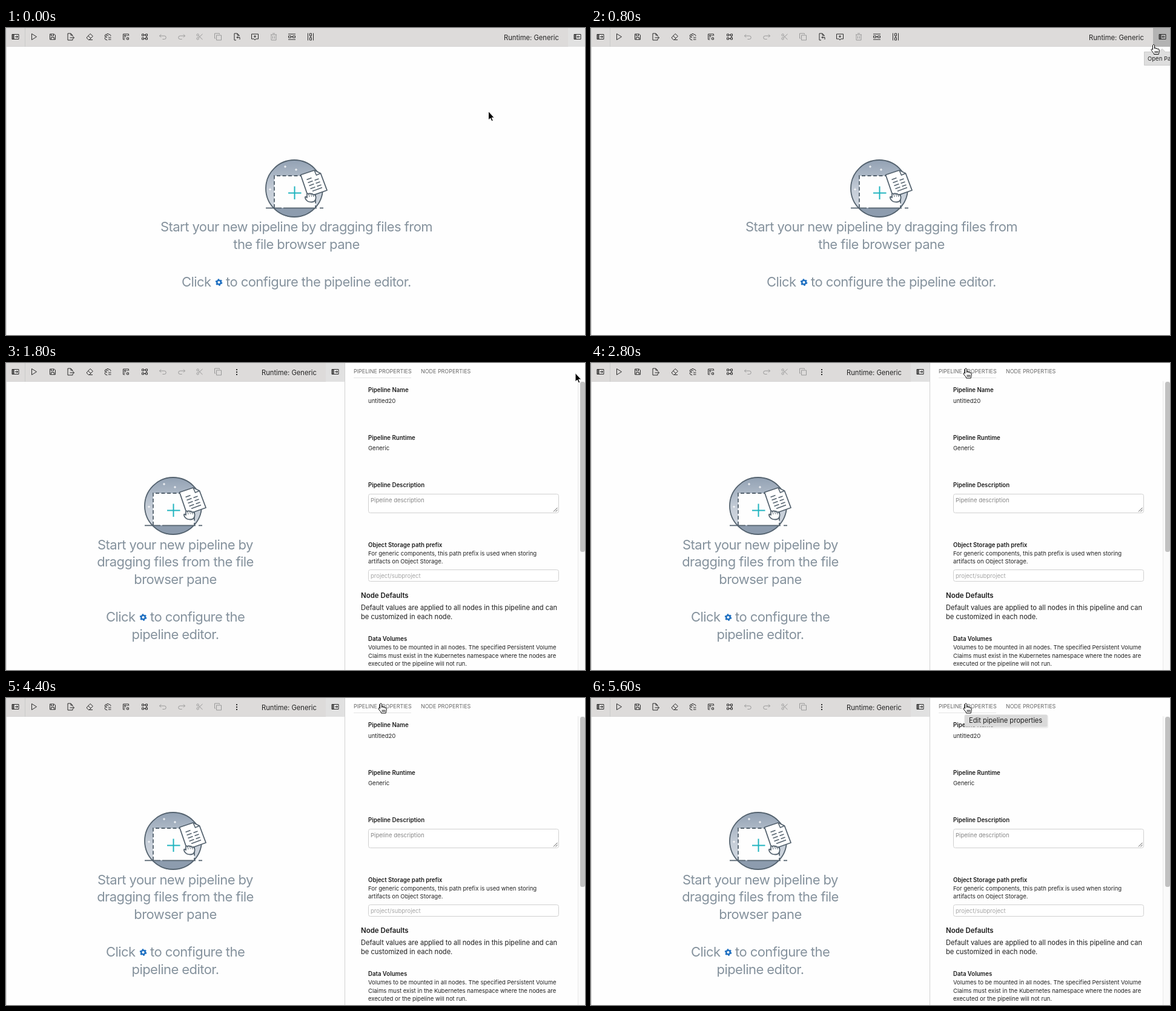
These frames come from a looping animation (956 by 507 pixels, 5800 ms). An HTML page:

```html
<!DOCTYPE html>
<html lang="en">
<head>
<meta charset="utf-8">
<title>Pipeline editor</title>
<style>
html, body { margin: 0; width: 100%; height: 100%; overflow: hidden; background: #fefefe; }
svg { display: block; width: 956px; height: 507px; font-family: Inter, "Open Sans", sans-serif; font-optical-sizing: none; }
text { white-space: pre; }
.big { font-size: 22px; letter-spacing: -.025em; fill: #85929d; }
.mid { text-anchor: middle; }
.bar { font-size: 11.2px; fill: #222; }
.tab { font-size: 8.95px; fill: #666; }
.label { font-size: 9.65px; font-weight: 600; fill: #1c1c1c; }
.small { font-size: 9.53px; fill: #222; }
.hint { fill: #858585; }
.faint { fill: #a5a5a5; }
.body { font-size: 11.13px; fill: #1c1c1c; }
.head { font-size: 11.45px; font-weight: 600; fill: #1c1c1c; }
.icon { fill: none; stroke: #2b2b2b; stroke-width: 1; }
.off { stroke: #999; }
.field { fill: #fff; stroke: #d0d0d0; }
.ink { fill: #fff; stroke: #55636f; stroke-width: 1.8; stroke-linejoin: round; }
.cursor { stroke-linejoin: round; stroke-width: 1; }
</style>
</head>
<body>
<svg id="stage" viewBox="0 0 956 507"></svg>
<script>
const stage = document.getElementById('stage');
const text = (cls, x, y, s) => `<text class="${cls}" x="${x}" y="${y}">${s}</text>`;
const rect = (x, y, w, h, fill, rest = '') => `<rect x="${x}" y="${y}" width="${w}" height="${h}" fill="${fill}" ${rest}/>`;

// Icon outlines, centred on 0,0
const shapes = {
  panel: 'M-5.5-4h11v8h-11zM-2.5-4v8M-4.5-4v8M-3.5-4v8M-.5 0h4M2-2l2 2l-2 2',
  panelLeft: 'M-5.5-4h11v8h-11zM-2.5-4v8M-4.5-4v8M-3.5-4v8M4 0h-4M1.5-2l-2 2l2 2',
  play: 'M-3.5-5L4.5 0L-3.5 5z',
  save: 'M-4.5-4.5h7l2 2v7h-9zM-2.5-4.5v3h4v-3M-2.5 4.5v-3.5h5v3.5',
  out: 'M3-1v-1.5l-3-3h-5v11h8v-2M0-5.5v3h3M-1.5 1.5h7M3.5-.5l2 2l-2 2',
  erase: 'M-5 1.5l6-6.5l4.5 4l-6 6h-1.5zM-2.5-1.5l4.5 4M-2 5h7',
  gear: 'M4.5-1l.5-1l-1.5-2l-1.500.5l-1-1.500h-2l-1 1.500l-1.500-.5l-1.500 2.500l1 1.500v1l-1 1.500l1.500 2.500l1.500-.5l1 1.500M1-1a2 2 0 1 0-2 2.500M1 1.500h4.500M1 4.500h4.500',
  grid: 'M4.5-1.500v-3h-9v9h3M-2.500-2.500h2v2h-2zM1-2h2M-3 2h2M1.500 1.500h3v3h-3z',
  nodes: 'M-4.500-4.500h3v3h-3zM1.500-4.500h3v3h-3zM-4.500 1.500h3v3h-3zM1.500 1.500h3v3h-3zM-1.500-3h3M-1.500 3h3M3-1.500v3',
  undo: 'M-3-4l-2.500 2.500l2.500 2.500M-5.500-1.500h8a2.700 2.700 0 0 1 0 5.500h-3',
  redo: 'M3-4l2.500 2.500l-2.500 2.500M5.500-1.500h-8a2.700 2.700 0 0 0 0 5.500h3',
  cut: 'M4.500-4.500l-6.500 6M4.500 4.500l-6.500-6M-1.700-3a1.700 1.700 0 1 0-3.400 0a1.700 1.700 0 1 0 3.400 0M-1.700 3a1.700 1.700 0 1 0-3.400 0a1.700 1.700 0 1 0 3.400 0',
  copy: 'M-2.500-2.500h8v8h-8zM-4 2.500h-1.500v-8h8v1.500',
  paste: 'M4-1v-1.500l-3-3h-5v11h3M1-5.500v3h3M5 4.500v-3.500h-5M2-1l-2 2l2 2',
  note: 'M-1.500 3.500h-4v-8h11v8h-4l-1.500 2zM-2-.5h4M0-2.500v4',
  trash: 'M-5-3.500h10M-2-5.500h4M-4-3.500v9h8v-9M-1.500-1v4M1.500-1v4',
  rows: 'M-6-4.500h12M-6 4.500h12M-5.500-1.500h4v3h-4zM1.500-1.500h4v3h-4zM-1.500 0h3',
  cols: 'M-4.500-6v12M4.500-6v12M-1.500-5.500h3v4h-3zM-1.500 1.500h3v4h-3zM0-1.500v3'
};
const icon = (name, x, off) => `<path class="icon ${off ? 'off' : ''}" transform="translate(${x} 14.5)" d="${shapes[name]}"/>`;
const iconRow = (names, first) => names.split(' ').map((n, i) =>
  icon(n, Math.round(first + i * 30.4), /undo|redo|cut|copy|trash/.test(n))).join('');

const cog = x => `<g transform="translate(${x} 420)" fill="none" stroke="#1f70c1">
  <circle r="3.3" stroke-width="2.5"/><circle r="4.8" stroke-width="2" stroke-dasharray="2.5 2.527"/></g>`;

const art = `<g id="art">
  <circle cx="476" cy="265" r="47.5" fill="url(#sky)"/>
  <path d="M440.5 297h71a47.5 47.5 0 0 1-71 0z" fill="#8d9cae"/>
  <circle cx="476" cy="265" r="47" fill="none" stroke="#55636f" stroke-width="1.8"/>
  <path d="M443 244h68v53h-68z" fill="#fefefe"/>
  <path d="M443 297v-53h46M511 274v23" fill="none" stroke="#55636f" stroke-width="1.8" stroke-dasharray="6 3.5"/>
  <path d="M429 297.4h26M458 297.4h55M518 297.4h6" stroke="#55636f" stroke-width="1.8"/>
  <path d="M461 227v4M459 229h4M479 232v4M477 234h4M436 264.5v4M434 266.5h4" stroke="#fff"/>
  <path d="M476.5 261.5v21.500M466 272.5h21.5" stroke="#20b4bf" stroke-width="2"/>
  <path class="ink" d="M486.5 242.500L509 235L519.5 240L530 268L499 279z"/>
  <path d="M509 235l3.5 8l7-3" fill="none" stroke="#55636f" stroke-width="1.6"/>
  <path d="M496.500 250.500l8-3M498.500 255.500l8-3M509.500 251.500l7-2.500M500.500 260.500l8-3M511.500 256.500l7-2.500M502.500 265.500l8-3M513.500 261.500l7-2.500M506 269.500l16-6" stroke="#55636f" stroke-width="1.5"/>
  <path class="ink" d="M495 283c-2-4-1-5 1-4l1 1v-5c0-2 2-2 3-.5c1-2 3-1.5 3.5 0c1-1.5 3-.5 3.5 1c2-1 4 .5 4.5 3c.5 4-1 9-7 9c-5 0-7-1-9.5-4.5z"/>
  <path d="M500 275l1 4M503.500 274.500l1 4M507 275.500l1 3.500" stroke="#55636f"/>
</g>`;

const wide = `<g id="wide">${rect(928, 0, 28, 31, '#e1e1e1', 'id="toggle"')}
  ${iconRow('paste note trash rows cols', 381)}${icon('panelLeft', 943.5)}
  ${text('bar', 822, 19.5, 'Runtime: Generic')}
  ${text('big mid', 479.5, 336, 'Start your new pipeline by dragging files from')}
  ${text('big mid', 479.5, 364.5, 'the file browser pane')}
  ${text('big', 290, 427, 'Click')}${cog(351.5)}${text('big', 363, 427, 'to configure the pipeline editor.')}
  <g id="openTip"><path d="M913.5 39.5h24l5.5-5l5.5 5h60v22h-95z" fill="#dedede" stroke="#cbcbcb"/>
  ${text('small', 919, 54, 'Open Panel')}</g></g>`;

const narrow = `<g id="narrow">${rect(528, 0, 31, 31, '#e1e1e1')}
  <path d="M381 10v2M381 14v2M381 18v2" stroke="#2b2b2b" stroke-width="2"/>
  ${icon('panel', 543.5)}${text('bar', 422, 19.5, 'Runtime: Generic')}
  ${text('big mid', 279.5, 307.5, 'Start your new pipeline by')}
  ${text('big mid', 279.5, 336, 'dragging files from the file')}
  ${text('big mid', 279.5, 364.5, 'browser pane')}
  ${text('big', 165, 427, 'Click')}${cog(226.5)}${text('big', 238, 427, 'to configure the')}
  ${text('big mid', 279.5, 455.5, 'pipeline editor.')}
  ${rect(559, 0, 397, 507, '#fefefe')}${rect(559, 0, 1, 507, '#d2d2d2')}
  ${text('tab', 574, 16.5, 'PIPELINE PROPERTIES')}${text('tab', 685, 16.5, 'NODE PROPERTIES')}
  ${rect(574, 24, 95, 1, '#e4e4e4')}
  ${rect(944, 30, 12, 477, '#fafafa')}${rect(944, 30, 1, 477, '#e8e8e8')}
  ${rect(948, 31, 8, 281, '#c1c1c1', 'rx="3.5"')}
  ${text('label', 598, 48, 'Pipeline Name')}${text('small', 598, 65.5, 'untitled20')}
  ${text('label', 598, 126.5, 'Pipeline Runtime')}${text('small', 598, 144, 'Generic')}
  ${text('label', 598, 205, 'Pipeline Description')}
  <rect class="field" x="598.5" y="216.5" width="314" height="31" rx="3"/>
  <path d="M904 245.5l6.500-6.500M907.5 245.5l3-3" stroke="#555"/>
  ${text('small hint', 602, 230, 'Pipeline description')}
  ${text('label', 598, 303.5, 'Object Storage path prefix')}
  ${text('small', 598, 317.5, 'For generic components, this path prefix is used when storing')}
  ${text('small', 598, 330.5, 'artifacts on Object Storage.')}
  <rect class="field" x="598.5" y="341.5" width="314" height="19" rx="3"/>
  ${text('small faint', 602, 354.5, 'project/subproject')}
  ${text('head', 586, 387.5, 'Node Defaults')}
  ${text('body', 586, 408, 'Default values are applied to all nodes in this pipeline and can')}
  ${text('body', 586, 422.5, 'be customized in each node.')}
  ${text('label', 598, 459, 'Data Volumes')}
  ${text('small', 598, 473, 'Volumes to be mounted in all nodes. The specified Persistent Volume')}
  ${text('small', 598, 486.5, 'Claims must exist in the Kubernetes namespace where the nodes are')}
  ${text('small', 598, 499.5, 'executed or the pipeline will not run.')}
  <g id="editTip">${rect(616, 28, 139, 22, '#000', 'rx="3" opacity=".06"')}
  ${rect(617, 27.5, 136.5, 20, '#dadada', 'rx="2"')}${text('body', 624, 41, 'Edit pipeline properties')}</g></g>`;

stage.innerHTML = `<defs><linearGradient id="sky" x2="0" y2="1">
  <stop stop-color="#92a1b3"/><stop offset=".55" stop-color="#c6ced8"/><stop offset="1" stop-color="#d5dbe2"/>
  </linearGradient></defs>
  ${rect(0, 0, 956, 507, '#fefefe')}${rect(0, 0, 956, 31, '#dddbda')}${rect(0, 30.5, 956, 0.5, '#cfcfcf')}
  ${rect(0, 0, 1, 507, '#d2d2d2')}${rect(31, 0, 1, 31, '#cacaca')}
  ${icon('panel', 15.5)}${iconRow('play save out erase gear grid nodes undo redo cut copy', 46.3)}
  ${art}${wide}${narrow}
  <path id="arrow" class="cursor" fill="#000" stroke="#fff" d="M0-.5v14.5l3.2-3l2.3 5l2.3-1l-2.2-4.8h4.2z"/>
  <path id="hand" class="cursor" fill="#fff" stroke="#000" stroke-width="1.2" d="M-1.5 1c0-2 3-2 3 0v5c0-1.6 2.7-1.6 2.7 0v.6c0-1.5 2.6-1.4 2.6 .2v.6c.2-1.2 2.4-1 2.4 .6v3c0 2-1 2.5-1 4.500h-7.5c-.5-2.5-3-4-4.5-7c-.7-1.6 1-2.3 2.3-.8z M2.3 10v3.5M4.5 10v3.5M6.7 10v3.5"/>`;

const LOOP = 5800, STEP = 200;
// time, x, y of the pointer tip
const path = [[0, 796.5, 138], [200, 796.5, 138], [800, 929, 28], [1200, 929, 28], [1600, 940, 17], [2000, 940, 17], [2800, 619, 9.5], [LOOP, 619, 9.5]];
const $ = id => document.getElementById(id);
const show = (id, on) => $(id).style.display = on ? '' : 'none';
const ease = p => p * p * (3 - 2 * p);

function pointer(t) {
  const i = path.findIndex(k => k[0] > t);
  const [a, b] = [path[i - 1], path[i]];
  const p = ease((t - a[0]) / (b[0] - a[0]));
  return [a[1] + (b[1] - a[1]) * p, a[2] + (b[2] - a[2]) * p];
}

function draw(now) {
  const t = Math.floor(now % LOOP / STEP) * STEP;
  const open = t >= 1800, hover = t >= 800 && !open;
  const [x, y] = pointer(t);
  const hand = hover || open && x < 768;
  show('wide', !open);
  show('narrow', open);
  show('openTip', hover);
  show('editTip', t >= 4600);
  show('hand', hand);
  show('arrow', !hand);
  $(hand ? 'hand' : 'arrow').setAttribute('transform', `translate(${x} ${y})`);
  $('art').setAttribute('transform', open ? 'translate(-200 -29)' : '');
  $('toggle').setAttribute('fill', hover ? '#b3b3b3' : '#e1e1e1');
  const fading = t >= 1600;
  $('openTip').setAttribute('opacity', fading ? .13 : 1);
  $('openTip').setAttribute('transform', fading ? 'translate(0 -17)' : '');
}

const start = performance.now();
(function frame() {
  draw(performance.now() - start);
  requestAnimationFrame(frame);
})();
</script>
</body>
</html>
```
